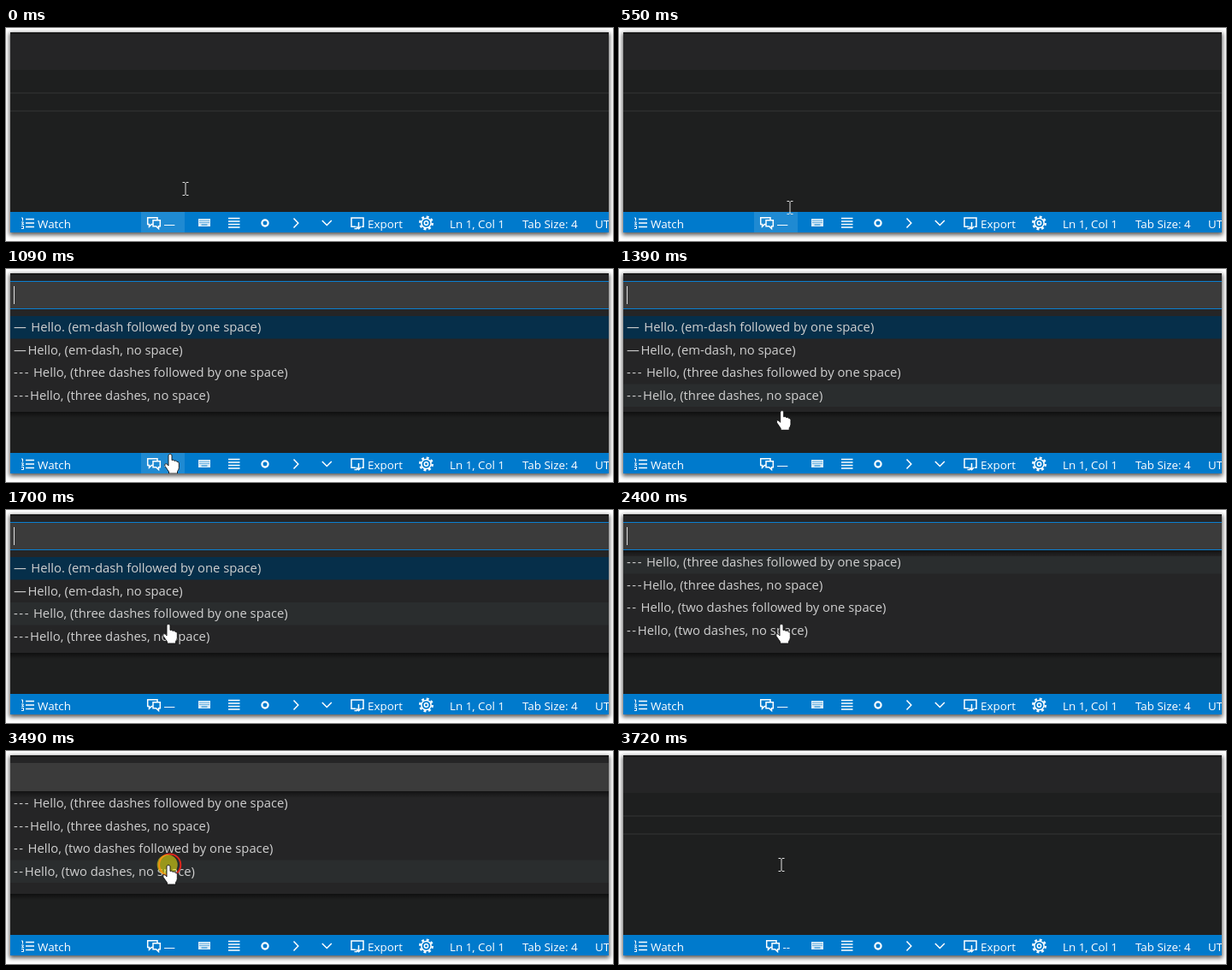
Recreate the animation shown at these times as an HTML page. Size 710x249 px, loop 4250 ms.

```html
<!DOCTYPE html>
<html lang="en">
<head>
<meta charset="utf-8">
<title>Status bar dash picker</title>
<style>
html, body { margin: 0; width: 100%; height: 100%; overflow: hidden; background: #fff; }
#win { position: absolute; left: 5px; top: 5px; width: 700px; height: 234px; overflow: hidden;
  background: #1e1f1f; box-shadow: 0 2px 5px 1px rgba(0,0,0,.65); }
svg { display: block; }
text { font-family: "Open Sans", "Noto Sans", sans-serif; white-space: pre; }
#list text { font-size: 14.8px; fill: #d0d0d0; }
#list tspan { letter-spacing: 1.6px; }
#bar text { font-size: 13.4px; fill: #fff; }
.ico { fill: none; stroke: #fff; stroke-width: 1.5; }
</style>
</head>
<body>
<div id="win">
<svg width="700" height="234" viewBox="5 5 700 234">
  <defs>
    <clipPath id="listClip"><rect x="5" y="54" width="700" height="113"/></clipPath>
    <linearGradient id="fade" x2="0" y2="1">
      <stop stop-color="#000" stop-opacity=".5"/><stop offset="1" stop-color="#000" stop-opacity="0"/>
    </linearGradient>
  </defs>

  <!-- editor -->
  <rect x="5" y="5" width="700" height="44" fill="#252526"/>
  <rect x="5" y="5" width="700" height="2" fill="#191919"/>
  <path d="M5 76H705M5 97H705" stroke="#292a2a" stroke-width="2"/>

  <!-- picker -->
  <g id="picker">
    <rect x="5" y="167" width="700" height="7" fill="url(#fade)"/>
    <rect x="5" y="7" width="700" height="160" fill="#252526"/>
    <rect x="5" y="14" width="700" height="33" fill="#3b3b3b"/>
    <path id="focus" d="M5 14.5H705M5 46.5H705" stroke="#0a7fd0"/>
    <path id="caret" d="M9.5 20V41" stroke="#ddd"/>
    <g clip-path="url(#listClip)">
      <g id="list">
        <rect x="5" y="55" width="700" height="26.5" fill="#062f4a"/>
        <rect id="hover" x="5" width="700" height="26.5" fill="#2a2d2e"/>
      </g>
    </g>
    <rect id="scrollShade" x="5" y="47" width="700" height="8" fill="url(#fade)"/>
  </g>

  <!-- status bar -->
  <g id="bar">
    <rect x="5" y="215" width="700" height="24" fill="#007acc"/>
    <rect id="lit" x="158" y="215" width="51" height="24" fill="#fff"/>
    <path class="ico" d="M23 223.5H33M23 228H33M23 232.5H33"/>
    <path class="ico" stroke-width="1" d="M18 222H19.5V225.5M18 227H20.5L18.5 229.5H21M18 231.5H20.5V234.5H18" style="stroke-width:1"/>
    <text x="37" y="233.5">Watch</text>
    <g id="dash">
      <path class="ico" d="M177 224V221.7H165.7V229.5H167.5V232.3L170.3 229.5H172M172 224.7H180.3V231.7H178.5V234.5L175.5 231.7H172Z"/>
      <text id="dashText" x="184.5" y="234"></text>
    </g>
    <rect x="225" y="223" width="14" height="9" fill="#d9ebf7"/>
    <path d="M226.5 225.2H238M226.5 227.5H238" stroke="#007acc" stroke-dasharray="1 1"/>
    <path d="M228.5 230H235.5" stroke="#007acc"/>
    <path class="ico" d="M260 222.5H273.5M260 226H273.5M260 229.5H273.5M260 233H273.5"/>
    <circle class="ico" cx="303" cy="228" r="3.6" style="stroke-width:2.2"/>
    <path class="ico" d="M336.5 222.5L341.8 228L336.5 233.5M369.8 225L375.3 230.5L380.8 225"/>
    <path class="ico" d="M409 232.3H404V222H418V232.3H416M407.5 234.5H411M412.5 227V234.5M409.8 232L412.5 234.7L415.2 232"/>
    <text x="423" y="233.5">Export</text>
    <circle class="ico" cx="491.5" cy="228" r="5.6"/>
    <circle class="ico" cx="491.5" cy="228" r="2.2"/>
    <circle class="ico" cx="491.5" cy="228" r="7.3" stroke-dasharray="2.87 2.87" style="stroke-width:2.4"/>
    <text x="519" y="233.5">Ln 1, Col 1</text>
    <text x="604" y="233.5">Tab Size: 4</text>
    <text x="689" y="233.5">UTF-8</text>
  </g>

  <!-- pointer, origin at its hot spot -->
  <g id="pointer">
    <g id="click">
      <circle cx="1.7" r="12.6" fill="none" stroke="#e0261c" stroke-width="2"/>
      <circle cx="-1.3" r="12" fill="#fffa0a" fill-opacity=".52"/>
    </g>
    <path id="beam" d="M-3.5 -7.5H-1L0 -6.5L1 -7.5H3.5M0 -6.5V6.5M-3.5 7.5H-1L0 6.5L1 7.5H3.5" fill="none" stroke="#e4e4e4"/>
    <path id="hand" d="M-2 1.5Q0 -1.5 2 1.5V7.5Q4 6.5 5 8.3Q7 7.4 8 9.3Q10 8.8 10.3 11V16.5Q10 19 8.5 20.5V23H-1.5V21L-6 14.5Q-7 12 -5 11.6Q-3.5 11.6 -2 14Z"
      fill="#fff" stroke="#111" stroke-width=".9"/>
  </g>
</svg>
</div>

<script>
const $ = id => document.getElementById(id);
const LOOP = 4250, ROW = 26.5;
const OPEN = 1090, SCROLL = 2400, PICK = 3490, CLOSE = 3640, APPLY = 3720;

const rows = [
  ["—", " Hello. (em-dash followed by one space)"],
  ["—", "Hello, (em-dash, no space)"],
  ["---", " Hello, (three dashes followed by one space)"],
  ["---", "Hello, (three dashes, no space)"],
  ["--", " Hello, (two dashes followed by one space)"],
  ["--", "Hello, (two dashes, no space)"],
];
$("list").insertAdjacentHTML("beforeend", rows.map(([dash, label], i) =>
  `<text x="9" y="${73.2 + i * ROW}"><tspan>${dash}</tspan>${label}</text>`).join(""));

// pointer moves: start, interval, steps, end x, end y
const moves = [
  [330, 76, 6, 190, 232],
  [OPEN, 75, 1, 192, 216],
  [1165, 75, 6, 190, 140],
  [1620, 80, 2, 190, 133],
];

function pointerAt(t) {
  let x = 210, y = 188;
  for (const [start, gap, steps, toX, toY] of moves) {
    if (t < start) break;
    const p = Math.min(1, (Math.floor((t - start) / gap) + 1) / steps);
    x += (toX - x) * p;
    y += (toY - y) * p;
  }
  return [x, y];
}

const show = (id, on) => $(id).style.display = on ? "" : "none";

function draw(t) {
  const [x, y] = pointerAt(t);
  const open = t >= OPEN && t < CLOSE;
  const scrolled = t >= SCROLL, picked = t >= PICK;
  const onBar = y >= 215;
  const isHand = onBar || (open && y < 167);

  show("picker", open);
  show("focus", !picked);
  show("caret", !picked);
  show("scrollShade", scrolled);
  show("hover", y < 167);
  $("hover").setAttribute("y", 55 + ROW * (picked ? 5 : Math.floor((y - 62) / ROW)));
  $("list").setAttribute("transform", `translate(0 ${scrolled ? -60 : 0})`);

  const pressed = t >= 940 && t < OPEN;
  show("lit", t < OPEN || onBar);
  $("lit").setAttribute("opacity", pressed ? .18 : .12);
  $("dash").setAttribute("transform", `translate(${t >= APPLY ? 7 : 0} 0)`);
  $("dashText").textContent = t >= APPLY ? "--" : "—";

  show("click", pressed || (picked && open));
  show("hand", isHand);
  show("beam", !isHand);
  $("pointer").setAttribute("transform", `translate(${x} ${y})`);
}

function frame() {
  draw(performance.now() % LOOP);
  requestAnimationFrame(frame);
}
frame();
</script>
</body>
</html>
```
